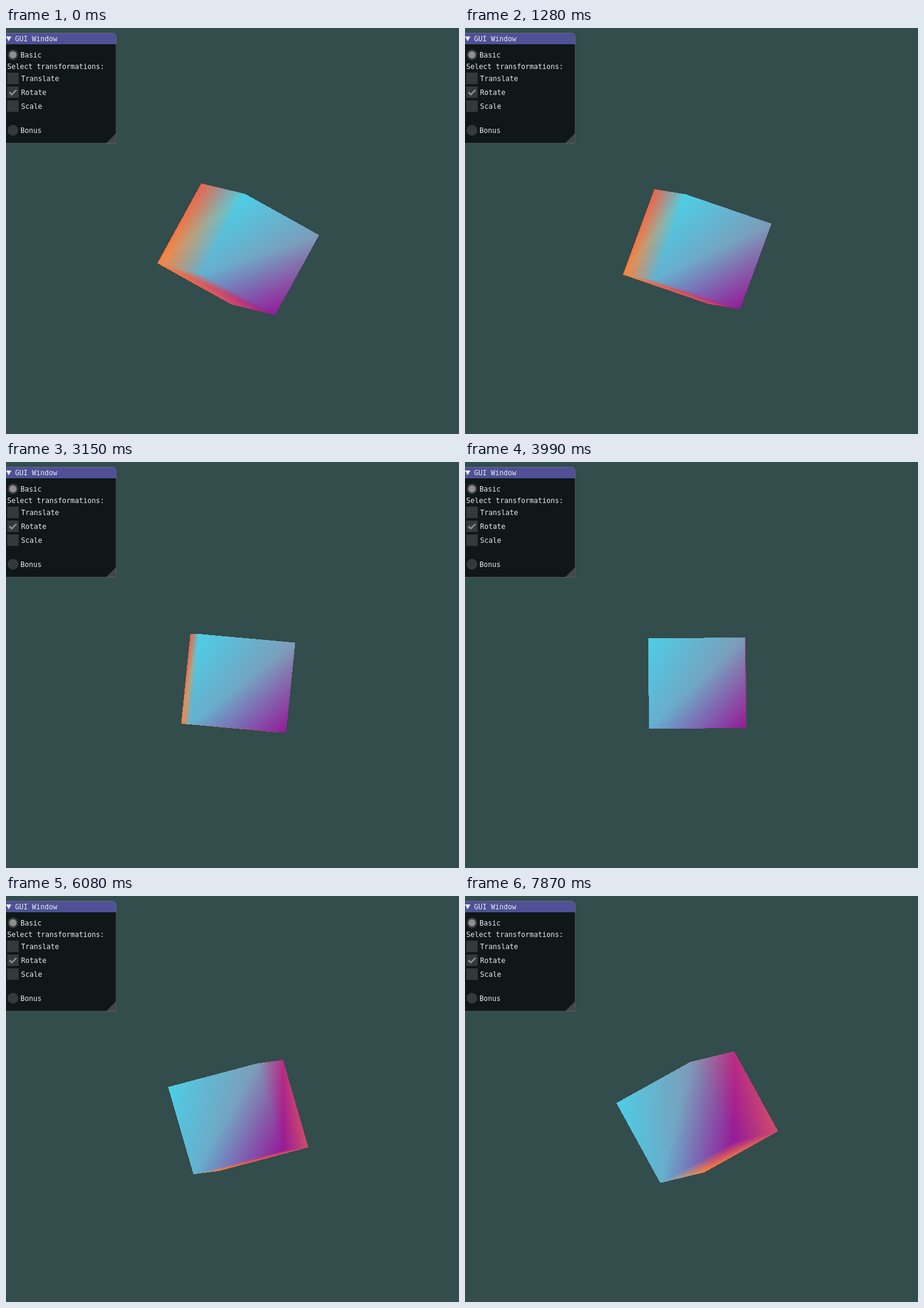
An HTML page with a canvas that plays this animation: 751x673 px, repeating every 8000 ms.

```html
<!DOCTYPE html>
<html lang="en">
<head>
<meta charset="utf-8">
<title>Rotating cube</title>
<style>
  html, body { margin: 0; width: 100%; height: 100%; overflow: hidden; background: #334c4c; }
  canvas, svg { position: absolute; left: 0; top: 0; display: block; }
  text { font: 11.63px "DejaVu Sans Mono", "Liberation Mono", monospace; fill: #e9ebeb; white-space: pre; }
  .frame { fill: #34393a; }
  .mark { fill: #8d8f8f; }
</style>
</head>
<body>
<canvas id="scene" width="751" height="673"></canvas>
<svg width="751" height="673" viewBox="0 0 751 673">
  <path d="M0 8H176Q183 8 183 15V191H0Z" fill="#0f1717"/>
  <path d="M0 8H176Q183 8 183 15V27H0Z" fill="#4e5196"/>
  <path d="M166 191L182.500 174.500V191Z" fill="#424747"/>
  <path d="M0 8.500H176Q182.500 8.500 182.500 15V191H0" fill="none" stroke="#808080" stroke-opacity=".5"/>
  <path d="M0 14H9L4.500 22Z" fill="#e9ebeb"/>
  <circle class="frame" cx="11.500" cy="44.500" r="9"/>
  <circle class="mark" cx="11.500" cy="44.500" r="6"/>
  <circle class="frame" cx="11.500" cy="169.500" r="9"/>
  <rect class="frame" x="2" y="74" width="19" height="19"/>
  <rect class="frame" x="2" y="97" width="19" height="19"/>
  <rect class="frame" x="2" y="120" width="19" height="19"/>
  <path d="M5.650 106.500L9.550 110.400L17.350 102.600" fill="none" stroke="#8d8f8f" stroke-width="2.600"/>
  <text x="15" y="22">GUI Window</text>
  <text x="24" y="49">Basic</text>
  <text x="2" y="68">Select transformations:</text>
  <text x="25" y="88">Translate</text>
  <text x="25" y="111">Rotate</text>
  <text x="25" y="134">Scale</text>
  <text x="24" y="174">Bonus</text>
</svg>
<script>
const LOOP = 8000;
const STEPS = 58;
const STEP_PHASE = .36;
const MAX_ANGLE = 40 * Math.PI / 180;
const CENTER = { x: 385, y: 366.6 };
const SCALE = { x: 80, y: 75 };
const VIEW = { x: 240, y: 246, w: 290, h: 242 };

// Corners run counterclockwise from bottom left, first in front, then behind.
const COLORS = ["#64b1cf", "#941a97", "#7e9bb8", "#4dcee6", "#ff823a", "#d04d6a", "#ba2d82", "#e8624c"]
  .map(hex => [1, 3, 5].map(i => parseInt(hex.slice(i, i + 2), 16)));
const CORNERS = COLORS.map((_, i) => ({
  x: (i + 1) & 2 ? 1 : -1,
  y: i & 2 ? 1 : -1,
  z: i < 4 ? 1 : -1
}));
// Front, right, left and bottom, each split from its first to its third corner.
const FACES = ["0123", "1562", "4037", "4510"].map(face => [...face].map(Number));

const ctx = document.getElementById("scene").getContext("2d");
const image = ctx.createImageData(VIEW.w, VIEW.h);

// Orthographic view of a turn about the axis (0, 1, -1).
function project({ x, y, z }, angle) {
  const c = Math.cos(angle), s = Math.sin(angle) * Math.SQRT1_2;
  return {
    x: CENTER.x - VIEW.x + SCALE.x * (c * x + s * (y + z)),
    y: CENTER.y - VIEW.y + SCALE.y * (s * x - (1 + c) / 2 * y + (1 - c) / 2 * z)
  };
}

const cross = (a, b, p) => (b.x - a.x) * (p.y - a.y) - (b.y - a.y) * (p.x - a.x);

function fillTriangle(corners, points) {
  const [a, b, c] = corners.map(i => points[i]);
  const [colorA, colorB, colorC] = corners.map(i => COLORS[i]);
  const area = cross(a, b, c);
  if (area >= 0) return; // facing away
  const left = Math.floor(Math.min(a.x, b.x, c.x)), right = Math.max(a.x, b.x, c.x);
  const top = Math.floor(Math.min(a.y, b.y, c.y)), bottom = Math.max(a.y, b.y, c.y);
  for (let y = top; y < bottom; y++) {
    for (let x = left; x < right; x++) {
      const pixel = { x: x + .5, y: y + .5 };
      const u = cross(b, c, pixel) / area;
      const v = cross(c, a, pixel) / area;
      const w = 1 - u - v;
      if (Math.min(u, v, w) < -1e-9) continue;
      const at = (y * VIEW.w + x) * 4;
      for (let k = 0; k < 3; k++) {
        image.data[at + k] = u * colorA[k] + v * colorB[k] + w * colorC[k];
      }
      image.data[at + 3] = 255;
    }
  }
}

function draw(angle) {
  const points = CORNERS.map(corner => project(corner, angle));
  image.data.fill(0);
  for (const [a, b, c, d] of FACES) {
    fillTriangle([a, b, c], points);
    fillTriangle([c, d, a], points);
  }
  ctx.putImageData(image, VIEW.x, VIEW.y);
}

let shown = -1;
function render(time) {
  const last = STEPS - 1;
  const step = Math.min(last, Math.floor(time % LOOP / LOOP * STEPS + STEP_PHASE));
  if (step === shown) return;
  shown = step;
  draw(MAX_ANGLE * (1 - 2 * step / last));
}

const start = performance.now();
function tick() {
  render(performance.now() - start);
  requestAnimationFrame(tick);
}
tick();
</script>
</body>
</html>
```
